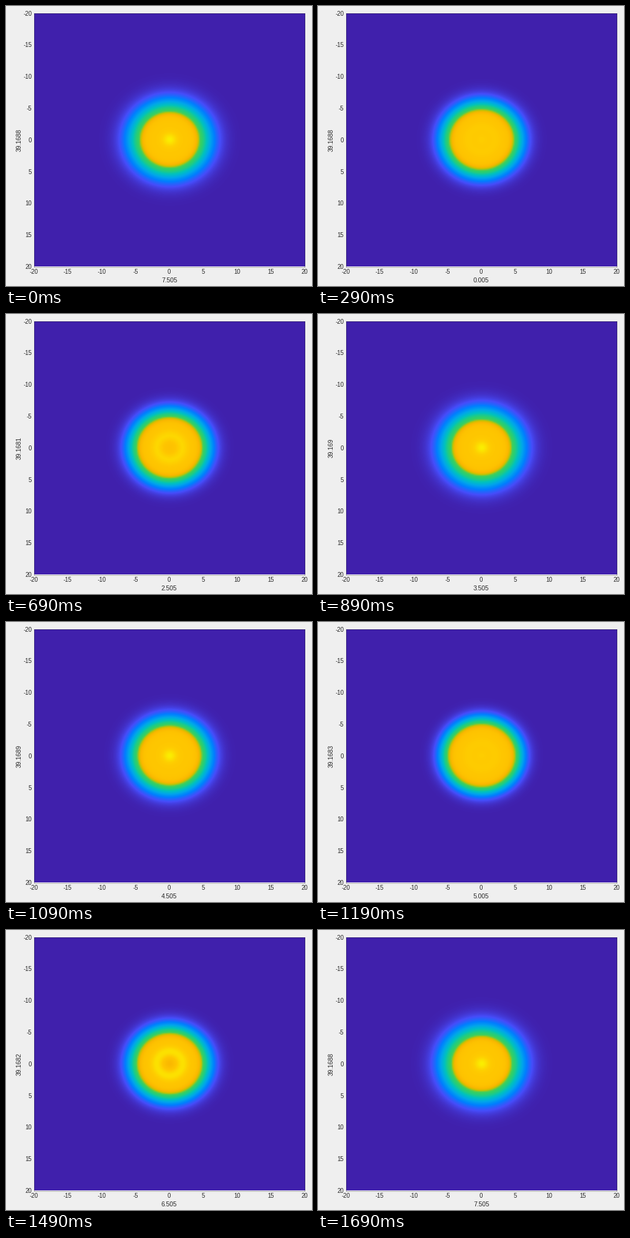
Recreate the animation shown at these times as a matplotlib script. Size 500 by 458 pixels, loop 1890 ms.

```python
import numpy as np
import matplotlib.pyplot as plt
from matplotlib.animation import FuncAnimation
from matplotlib.colors import LinearSegmentedColormap

W, H, DPI = 500, 458, 100
LEFT, RIGHT, TOP, BOTTOM = 45.5, 488, 12, 426.5
STEP_MS, LOOP_MS, HOLD_MS, STATE_MS = 10, 1890, 290, 100
STATES = 15
GRID = 200
PERIOD = 4
PLATEAU, RIM = .875, .64

COLORS = [(0, "#4020ac"), (.125, "#464dfa"), (.25, "#007eff"),
          (.375, "#00a6ea"), (.5, "#00c2bd"), (.625, "#30d068"),
          (.75, "#cac100"), (.81, "#fab700"), (.875, "#ffc700"),
          (1, "#f9fb00")]

# Total norm at a few moments, eased between them
NORM_T = [.005, 1.005, 2.505, 3.505, 4.505, 5.505, 7.505]
NORM = [39.1688, 39.1686, 39.1681, 39.169, 39.1689, 39.1676, 39.1688]


def wave(t, peak):
    return np.cos(2 * np.pi * (t - peak) / PERIOD)


def bump(r, center, width):
    return np.exp(-((r - center) / width) ** 2)


def density(r, t):
    """Breathing disc: flat core with a ripple, soft rim and long tail."""
    edge = 4.87 + .37 * np.tanh(t / 1.5) * wave(t, 5.6)
    core = .015 + .11 * min(1, t / 3.5) ** 2 * wave(t, 4)
    ring = max(0, .02 - .7 * core)

    depth = np.maximum(edge - r, 0)
    inside = PLATEAU - (PLATEAU - RIM) * np.exp(-depth / .45)
    inside += core * bump(r, 0, .9) + ring * bump(r, 1.9, .7)

    spread = 7.75 - 1.23 * edge
    outside = RIM * np.exp(-(np.maximum(r - edge, 0) / spread) ** 1.65)
    return np.where(r < edge, inside, outside)


def state_time(k):
    # One half step is skipped early in the run
    return (k if k < 3 else k + 1) / 2 + .005


axis = (np.arange(GRID) + .5) / GRID * 40 - 20
radius = np.hypot(*np.meshgrid(axis, axis))
states = []
for k in range(STATES):
    t = state_time(k)
    states.append((density(radius, t), f"{t:.3f}",
                   f"{np.interp(t, NORM_T, NORM):.6g}"))

fig = plt.figure(figsize=(W / DPI, H / DPI), dpi=DPI, facecolor="#efefef")
ax = fig.add_axes([LEFT / W, 1 - BOTTOM / H,
                   (RIGHT - LEFT) / W, (BOTTOM - TOP) / H])
ax.set(xticks=[], yticks=[])
for spine in ax.spines.values():
    spine.set(color="#262626", alpha=.5, linewidth=.7 * 72 / DPI)
image = ax.imshow(states[-1][0], vmin=0, vmax=1, aspect="auto",
                  cmap=LinearSegmentedColormap.from_list("density", COLORS),
                  interpolation="bilinear", extent=(-20, 20, 20, -20))


def label(x, y, text, size, **kw):
    return fig.text(x / W, 1 - y / H, text, fontsize=size * 72 / DPI,
                    family="Liberation Sans", color="#262626",
                    va="baseline", **kw)


for n in range(-20, 21, 5):
    f = (n + 20) / 40
    label(LEFT + f * (RIGHT - LEFT), 438.5, str(n), 9.6, ha="center")
    label(42.3, TOP + f * (BOTTOM - TOP) + 3.5, str(n), 9.6, ha="right")

time_text = label(266.8, 451.8, "", 10.2, ha="center")
norm_text = label(24.3, 219, "", 10.2, ha="center", rotation=90,
                  rotation_mode="anchor")


def update(i):
    # The last state also holds at the start of the loop
    k = (i * STEP_MS - HOLD_MS) // STATE_MS
    if not 0 <= k < STATES:
        k = STATES - 1
    values, time, norm = states[k]
    image.set_data(values)
    time_text.set_text(time)
    norm_text.set_text(norm)
    return image, time_text, norm_text


anim = FuncAnimation(fig, update, frames=LOOP_MS // STEP_MS,
                     interval=STEP_MS, repeat=True, repeat_delay=0)
plt.show()
```
